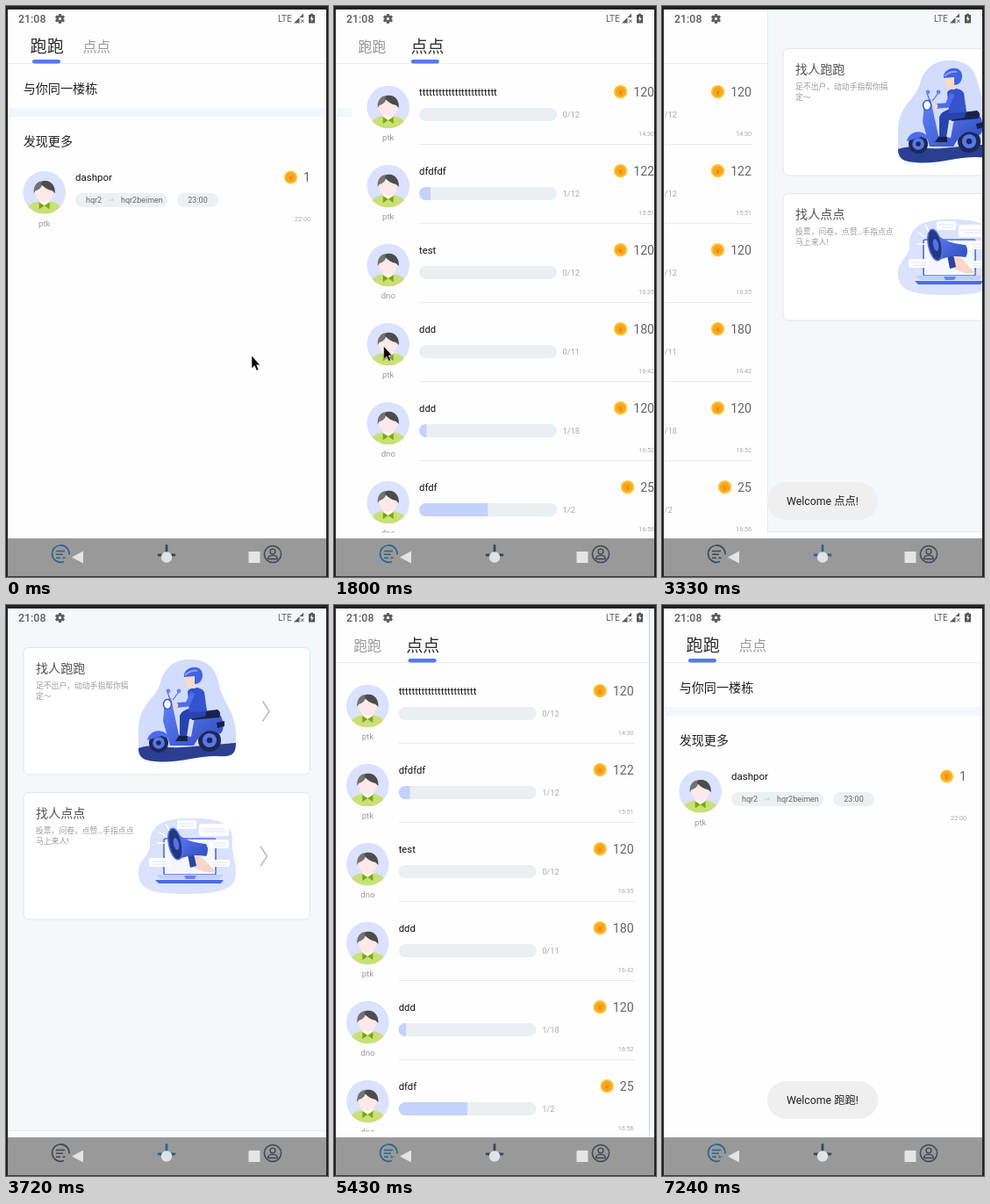
Animation, 367 px wide and 650 px high, one loop 8.16 s. Source, as an HTML page:

```html
<!DOCTYPE html>
<html lang="zh-CN">
<head>
<meta charset="utf-8">
<title>Errand app</title>
<style>
html, body { margin: 0; width: 100%; height: 100%; overflow: hidden; background: #232124; }
svg { display: block; width: 367px; height: 650px; font-family: Roboto, "Noto Sans CJK SC", "Noto Sans CJK", sans-serif; }
</style>
</head>
<body>
<svg id="stage" viewBox="0 0 367 650"></svg>
<script>
const LOOP = 8160, W = 363, SLOP = 8;

// ---- drawing helpers ----
const text = (x, y, size, str, fill = '#222', anchor = 'start', extra = '') =>
  `<text x="${x}" y="${y}" font-size="${size}" fill="${fill}" text-anchor="${anchor}" ${extra}>${str}</text>`;
const rect = (x, y, w, h, fill, r = 0, extra = '') =>
  `<rect x="${x}" y="${y}" width="${w}" height="${h}" rx="${r}" fill="${fill}" ${extra}/>`;
const circle = (x, y, r, fill, extra = '') =>
  `<circle cx="${x}" cy="${y}" r="${r}" fill="${fill}" ${extra}/>`;
const path = (d, fill, extra = '') => `<path d="${d}" fill="${fill}" ${extra}/>`;
const line = (d, color, width = 1, extra = '') =>
  path(d, 'none', `stroke="${color}" stroke-width="${width}" ${extra}`);
const group = (inner, extra = '') => `<g ${extra}>${inner}</g>`;

const avatar = (y, name) => group(
  circle(0, 0, 24.3, '#dae2ff') +
  group(
    path('M-21 24C-20 13-12 11-5 10H5C12 11 20 13 21 24Z', '#cadf76') +
    path('M-6 10L0 15L6 10V5H-6Z', '#fff') +
    path('M-11-4C-11 6-6 11 0 11S11 6 11-4L6-11H-6Z', '#fde9e9') +
    path('M-12 1C-13-9-7-13-2-13C-1-7-6-3-10-2Z', '#737373') +
    path('M-2-13C8-15 13-7 12 1L9-2C4-3-1-6-4-10Z', '#4c4c4c') +
    path('M0 15L-6 11.5V19ZM0 15L6 11.5V19Z', '#7ba513'),
    'clip-path="url(#round)"'),
  `transform="translate(43.7 ${y})"`) +
  text(43.7, y + 38.3, 9.6, name, '#999', 'middle');

const price = (y, n) => {
  const x = 332.5 - 8 * String(n).length;
  return circle(x, y, 7.6, '#fcc235') + circle(x, y, 5.6, '#f9a51f') +
    text(x, y + 3, 8, '¥', '#d97a0c', 'middle') +
    text(347, y + 5, 14.2, n, '#666', 'end');
};
const clock = (y, s) => text(347, y, 7.2, s, '#aaa', 'end');

// ---- pages ----
const runPage =
  text(19.7, 98.7, 14.1, '与你同一楼栋') +
  rect(2, 116, W, 10, '#f3f7fb') +
  text(19.7, 158.7, 14.1, '发现更多') +
  avatar(212.3, 'ptk') +
  text(79, 199, 11.5, 'dashpor', '#111') +
  rect(79, 213, 105, 16, '#ecf0f2', 8) + rect(195, 213, 47, 16, '#ecf0f2', 8) +
  text(91, 224.3, 9, 'hqr2', '#666') + text(131, 224.3, 9, 'hqr2beimen', '#666') +
  line('M117 221H123M121 219L123 221', '#c3c7ca', .8) +
  text(218.5, 224.3, 9, '23:00', '#666', 'middle') +
  price(195, 1) + clock(245, '22:00');

const tasks = [
  ['t'.repeat(24), 'ptk', 0, 12, 120, '14:30'],
  ['dfdfdf', 'ptk', 1, 12, 122, '15:51'],
  ['test', 'dno', 0, 12, 120, '16:35'],
  ['ddd', 'ptk', 0, 11, 180, '16:42'],
  ['ddd', 'dno', 1, 18, 120, '16:52'],
  ['dfdf', 'dno', 1, 2, 25, '16:56']
];
const taskRow = ([title, name, done, total, cost, time], i) => {
  const y = 90 * i;
  return avatar(y + 115, name) +
    text(79, y + 101.5, 11.3, title, '#111') +
    rect(79, y + 116, 157, 15, '#ebeff2', 7.5) +
    group(rect(79, y + 116, 157 * done / total, 15, '#c4d1fd'),
      `clip-path="inset(0 round 7.5px 0 0 7.5px)"`) +
    text(242.5, y + 127, 9.3, done + '/' + total, '#aaa') +
    price(y + 97.7, cost) + clock(y + 148, time) +
    rect(79, y + 157, 269, 1, '#e8ebed');
};

const scooter =
  path('M151 140C152 112 172 106 176 88C181 67 198 61 212 62C234 63 240 76 243 92C247 110 262 122 262 148V159L151 166Z', '#d2dcfd') +
  path('M151 163C168 157 180 164 200 162C225 160 245 158 262 157C262 170 258 173 240 172C215 172 195 181 170 178C155 177 151 172 151 163Z', '#2a3f92') +
  [[174, 157, 11], [232, 154, 13]].map(([x, y, r]) =>
    circle(x, y, r, '#1c2857') + circle(x, y, r * .62, '#5a78e8') + circle(x, y, r * .25, '#1c2857')).join('') +
  path('M181 108L188 106L197 148L211 150L215 128L245 126C250 138 247 146 243 147C229 138 222 146 214 160H187L179 132Z', 'url(#blue)') +
  path('M161 154C163 142 180 138 188 153L177 149Z', '#4c6cec') +
  path('M209 123L241 119Q246 122 243 128L212 131Z', '#18234d') +
  path('M240 134L249 132V138L241 140Z', '#17214a') +
  line('M187 108L184 99M190 108L197 99', '#4c6cec', 1.2) +
  circle(185, 98, 2.4, '#6a86f2') + circle(197, 98, 2.4, '#6a86f2') +
  '<ellipse cx="184" cy="113" rx="4.5" ry="5.5" fill="#fff" stroke="#3554cc" stroke-width="1.5"/>' +
  path('M211 117L229 118L227 127L209 130L206 150H198V126Q200 120 211 117Z', '#2743ae') +
  path('M197 149H207V155H193Z', '#17214a') +
  path('M207 98C212 92 222 93 226 99L229 121L209 122Z', '#3553cc') +
  line('M213 100L207 113L195 114', '#4d6df0', 5.5, 'stroke-linejoin="round"') +
  circle(193.5, 114, 2.8, '#f8d4c8') +
  path('M204 81H216V95H208Q204 92 204 81Z', '#f9d9ce') +
  path('M203 82C201 70 224 65 224 80C224 87 219 90 215 90V81Z', '#4263e0') +
  line('M204 80Q210 74 218 75', '#8ba2f8', 2);

const bubbles = [[195, 245, 22, 10], [220, 249, 34, 14], [232, 267, 22, 10], [163, 288, 23, 10], [231, 290, 24, 8]];
const megaphone =
  path('M151 306C150 288 166 286 164 270C164 250 182 243 205 243C236 242 258 246 258 266C257 286 263 293 262 307C261 325 240 329 206 329C170 329 151 325 151 306Z', '#dae2fe') +
  rect(180, 266, 59, 41, '#f4f7ff', 2, 'stroke="#4b6ce8" stroke-width="1.6"') +
  path('M171 307H248L243 312H176Z', '#c2cffc') + path('M170 313H248L245 317H174Z', '#4b6ce8') +
  path('M203 308H217L215 312H205Z', '#6a86f2') +
  bubbles.map(([x, y, w, h]) => rect(x, y, w, h, '#fff', 2) +
    line(`M${x + 3} ${y + h / 2 - 1}h${w - 6}m0 3h${8 - w}`, '#d5defc', .8)).join('') +
  path('M212 288L220 284L239 304H227L209 297Z', '#f8d5c9') +
  path('M207 284L214 283L217 297L210 299Z', '#2b449f') +
  path('M190 255C203 269 214 270 228 272Q232 279 228 286C214 284 207 285 196 290Z', 'url(#blue)') +
  '<ellipse cx="193" cy="272" rx="7.5" ry="18" transform="rotate(-12 193 272)" fill="#24377f" stroke="#5373ea" stroke-width="1.5"/>' +
  '<ellipse cx="194" cy="272" rx="3" ry="7" transform="rotate(-12 194 272)" fill="#5373ea"/>' +
  line('M182 263L174 258M181 271L172 271M186 257L182 249', '#fff', 1.3);

const card = (y, title, lines, art, cx) =>
  rect(20, y, 326.5, 144.5, '#fff', 6, 'stroke="#e2e5e8"') +
  text(34, y + 28.5, 14.1, title, '#555') +
  lines.map((s, i) => text(34, y + 46.3 + 12.5 * i, 8.8, s, '#999')).join('') + art +
  line(`M${cx} ${y + 61}l7.5 11.5l-7.5 11.5`, '#c2c2c2', 1.7);

const cardsPage =
  rect(2, 4, W, 602, '#f4f8fb') +
  card(48.5, '找人跑跑', ['足不出户，动动手指帮你搞', '定～'], scooter, 292.5) +
  card(213.5, '找人点点', ['投票，问卷，点赞…手指点点', '马上来人!'], megaphone, 290) +
  rect(2, 599, W, 7, '#fcfdfe') + rect(2, 598, W, 1, '#e6eaed');

const homePage =
  rect(2, 4, W, 602, '#fefefe') +
  group(group(runPage, 'id="run"') + group(tasks.map(taskRow).join(''), 'id="list"'), 'clip-path="url(#body)"') +
  rect(2, 65, W, 1, '#eaedf0') +
  text(27.5, 0, 19, '跑跑', '#333', 'start', 'id="tab0"') +
  text(87.5, 0, 16, '点点', '#999', 'start', 'id="tab1"') +
  rect(30, 61, 32, 4.5, '#557af0', 2.2, 'id="bar"');

const gear = Array.from({ length: 6 }, (_, i) =>
  rect(-1.5, -5.6, 3, 4, '#5e5e5e', .5, `transform="rotate(${i * 60})"`)).join('') +
  circle(0, 0, 3, 'none', 'stroke="#5e5e5e" stroke-width="2.4"');
const statusBar =
  text(14, 19, 12.4, '21:08', '#5e5e5e', 'start', 'font-weight="500"') +
  group(gear, 'transform="translate(61.5 14.5)"') +
  text(310, 18, 10, 'LTE', '#5e5e5e') +
  path('M328 19.5L339 8.5V13H334.5V19.5Z', '#5e5e5e') +
  line('M336 15.5L339.5 19M339.5 15.5L336 19', '#5e5e5e', 1) +
  path('M345 10H347V8.7H350V10H352V19.5H345Z', '#555') +
  path('M349 11L346.7 15H348.2V18L350.5 14H349Z', '#fff');

const navBar =
  rect(2, 606, W, 43.2, '#999') +
  group(
    line('M72 624.5A9.7 9.7 0 1 0 66 632.6', 'currentColor', 1.6) +
    line('M57 620.5H67M57 624.3H65M57 628.2H62M64.5 628.2H67.5', 'currentColor', 1.6), 'id="nav0"') +
  group(line('M183 614.5V621M174 625H192', 'currentColor', 2.8, 'stroke-linecap="round"'), 'id="nav1"') +
  group(
    circle(304, 624, 9.6, 'none', 'stroke="#414750" stroke-width="1.5"') +
    circle(304, 621, 2.9, 'none', 'stroke="#414750" stroke-width="1.4"') +
    line('M298.5 629.5C299 624 309 624 309.5 629.5Z', '#414750', 1.4)) +
  path('M75 627.5L88 620.5V634.5Z', '#e4e4e4') +
  circle(183, 627.5, 6.2, '#e0e2e3') +
  rect(276.5, 621, 13, 13, '#e4e4e4', .5);

const stage = document.getElementById('stage');
stage.innerHTML = `<defs>
  <clipPath id="screen">${rect(2, 4, W, 602, '#000')}</clipPath>
  <clipPath id="body">${rect(2, 66, W, 533.5, '#000')}</clipPath>
  <clipPath id="round">${circle(0, 0, 24.3, '#000')}</clipPath>
  <linearGradient id="blue" x2="1" y2="1"><stop stop-color="#6383f8"/><stop offset="1" stop-color="#2e4bbd"/></linearGradient>
  </defs>` +
  rect(0, 0, 367, 650, '#232124') +
  group(group(homePage, 'id="home"') + group(cardsPage, 'id="cards"'), 'clip-path="url(#screen)"') +
  statusBar + navBar +
  group(rect(120, 542, 126, 43, '#efefef', 21.5) +
    text(183, 568, 12.3, '', '#222', 'middle', 'id="msg"'), 'id="toast"') +
  group(circle(.8, -.3, 10, 'none', 'id="press" stroke="#111" stroke-width="1"') +
    path('M0 0V14.5L3.3 11.5L5.7 17L7.9 16L5.6 10.7H9.6Z', '#000', 'stroke="#fff" stroke-width=".5"'), 'id="cursor"');

const el = {};
stage.querySelectorAll('[id]').forEach(e => el[e.id] = e);

// ---- motion ----
// Pointer path: time, x, y
const pointer = [
  [0, 280, 398], [500, 268, 397], [700, 260.5, 396], [830, 248, 396], [940, 185.5, 394.5],
  [1310, 26, 391], [1460, 17, 391], [1620, 17, 390], [2400, 188, 378], [2800, 186, 377],
  [2850, 182.5, 377], [3200, 14, 385], [3290, -14, 387], [3850, -14, 400], [4080, 91, 406],
  [4140, 67, 411], [4570, 67, 411], [4720, 121.5, 411], [4900, 161.5, 411.5], [5150, 345, 405],
  [5220, 385, 402], [5700, 385, 396], [6080, 130, 392], [6370, 110, 392], [6510, 133, 392],
  [6680, 310, 396], [6800, 385, 400], [LOOP, 385, 400]
];
// Each swipe drags its pager with the pointer, then settles on `to`.
const swipes = [
  { pager: 'tab', down: 700, up: 1600, from: 0, to: 1 },
  { pager: 'page', down: 2800, up: 3280, from: 0, to: 1 },
  { pager: 'page', down: 4720, up: 5150, from: 1, to: 0 },
  { pager: 'tab', down: 6370, up: 6680, from: 1, to: 0 }
];
const toasts = [
  { from: 1950, until: 3650, msg: 'Welcome 点点!' },
  { from: 6950, until: 9000, msg: 'Welcome 跑跑!' }
];

const clamp = v => Math.min(1, Math.max(0, v));
const easeOut = p => 1 - (1 - clamp(p)) ** 3;
const mix = (a, b, p) => a + (b - a) * p;

function pointerAt(t) {
  const i = Math.max(1, pointer.findIndex(k => k[0] >= t));
  const [a, b] = [pointer[i - 1], pointer[i]];
  const p = (t - a[0]) / (b[0] - a[0]);
  return [mix(a[1], b[1], p), mix(a[2], b[2], p)];
}

const lastSwipe = (pager, t) => swipes.filter(s => s.pager === pager && s.down <= t).pop();

function scrollAt(pager, t) {
  const s = lastSwipe(pager, t);
  if (!s) return 0;
  const moved = pointerAt(s.down)[0] - pointerAt(Math.min(t, s.up))[0];
  const drag = Math.sign(moved) * Math.max(0, Math.abs(moved) - SLOP);
  const held = s.from * W + drag;
  return t < s.up ? held : mix(held, s.to * W, easeOut((t - s.up) / 420));
}

function selected(pager, t, span) {
  const s = lastSwipe(pager, t);
  return s ? mix(s.from, s.to, easeOut((t - s.up) / span)) : 0;
}

const shift = (e, x, y = 0) => e.setAttribute('transform', `translate(${x.toFixed(2)} ${y.toFixed(2)})`);

function styleTab(e, on) {
  const c = Math.round(mix(153, 45, on));
  e.setAttribute('font-size', mix(15.8, 19.2, on));
  e.setAttribute('y', mix(52, 53, on));
  e.setAttribute('fill', `rgb(${c},${c},${c})`);
}

function draw(t) {
  const tab = scrollAt('tab', t), page = scrollAt('page', t);
  shift(el.run, -tab);
  shift(el.list, W - tab);
  shift(el.home, -page);
  shift(el.cards, W - page);

  const on = selected('tab', t, 300);
  styleTab(el.tab0, 1 - on);
  styleTab(el.tab1, on);
  shift(el.bar, 60 * on);

  const onCards = selected('page', t, 1) > .5;
  el.nav0.style.color = onCards ? '#414750' : '#28658f';
  el.nav1.style.color = onCards ? '#28658f' : '#414750';

  const toast = toasts.find(o => t >= o.from && t < o.until);
  el.toast.setAttribute('opacity', toast ? Math.min(clamp((t - toast.from) / 250), clamp((toast.until - t) / 250)) : 0);
  if (toast) el.msg.textContent = toast.msg;

  shift(el.cursor, ...pointerAt(t));
  el.press.style.display = swipes.some(s => t >= s.down && t < s.up) ? '' : 'none';
}

const start = performance.now();
(function tick() {
  draw((performance.now() - start) % LOOP);
  requestAnimationFrame(tick);
})();
</script>
</body>
</html>
```
